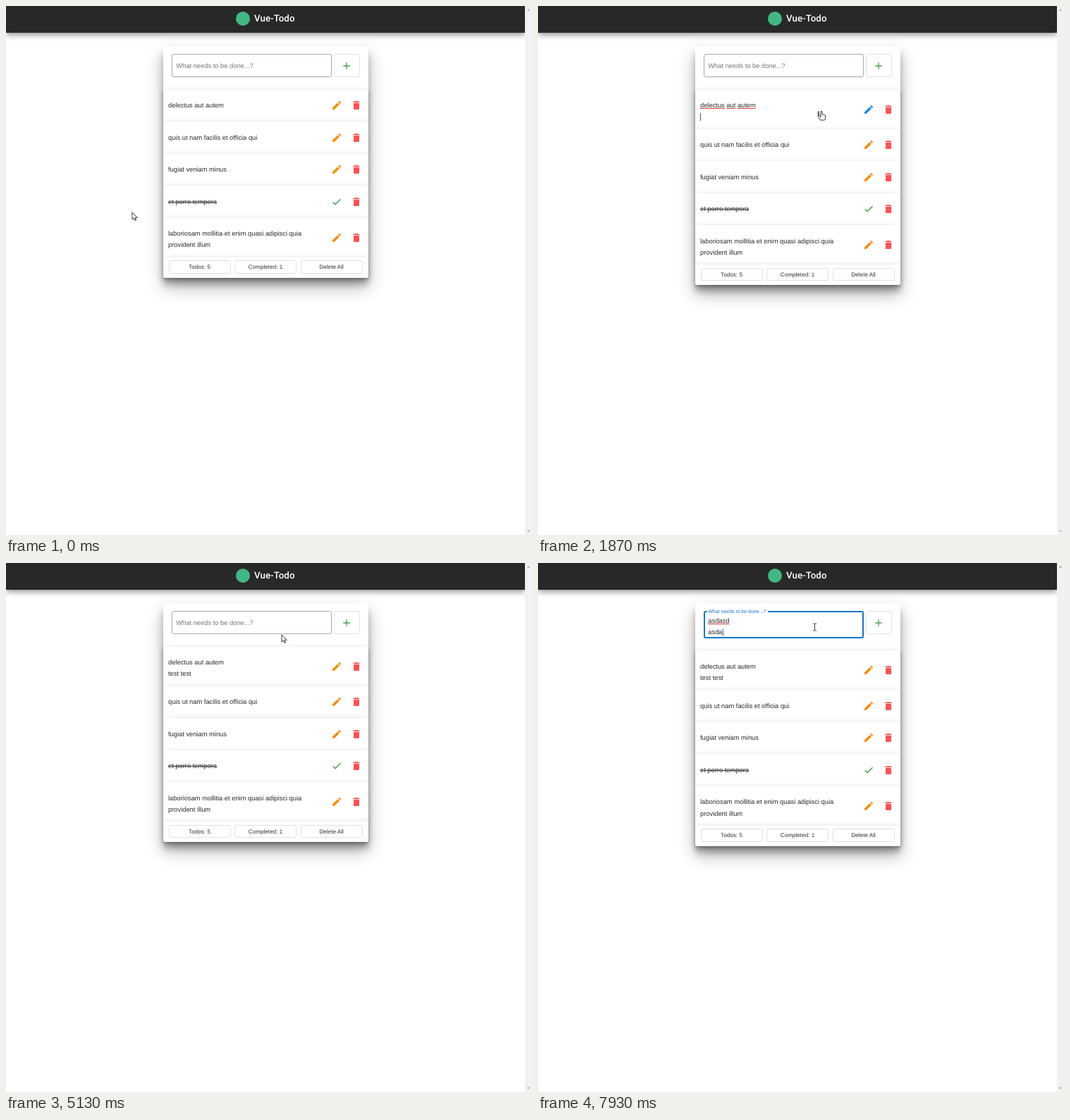
Recreate the animation shown at these times as an HTML page. Size 746 by 751 pixels, loop 8 s.

```html
<!DOCTYPE html>
<html lang="en">
<head>
<meta charset="utf-8">
<title>Vue-Todo</title>
<style>
html, body { margin: 0; width: 100%; height: 100%; overflow: hidden; background: #fff; }
body { position: relative; font: 9.33px/16.33px "Liberation Sans", Arial, sans-serif; color: #2b2b2b; text-rendering: geometricPrecision; }
body *, body { box-sizing: border-box; }
header { position: absolute; left: 0; top: 0; width: 736px; height: 37.5px; background: #282828; color: #fff;
  box-shadow: 0 2.7px 8px rgba(0,0,0,.42); font: 500 13.33px/37px Roboto, sans-serif; letter-spacing: .1px; }
header b { position: absolute; left: 326px; top: 8px; width: 20px; height: 20px; border-radius: 50%; background: #41b883; }
header span { position: absolute; left: 352px; }
#bar { position: absolute; right: 0; top: 0; width: 10px; height: 100%; background: #f1f1f1; }
#bar path { fill: #a3a3a3; }
main { position: absolute; left: 223px; top: 57px; width: 290.5px; background: #fff; border-radius: 2.7px;
  box-shadow: 0 12.7px 25px rgba(0,0,0,.3), 0 10px 8px rgba(0,0,0,.22); }
#pane { position: relative; height: 61.5px; }
#field, #add { position: absolute; top: 11.2px; height: 33px; border-radius: 2.7px; }
#field { left: 11.7px; width: 227.6px; border: 1px solid #a8a8a8; }
#add { left: 241.5px; width: 37.5px; border: 1px solid #e2e2e2; }
#add svg { left: 9.8px; top: 7.5px; color: #43a047; }
#notch { position: absolute; left: 16.5px; top: 10px; height: 4px; background: #fff; }
#label { position: absolute; left: 18.3px; top: 0; line-height: 12px; white-space: pre; transform-origin: 0 0; }
#input { position: absolute; left: 18.3px; top: 17px; white-space: pre; }
.row, footer { position: relative; background: #fff;
  box-shadow: 0 2px 3.3px -.7px rgba(0,0,0,.2), 0 3.3px 5.3px rgba(0,0,0,.14), 0 .7px 9px rgba(0,0,0,.12); }
.row { min-height: 45.5px; padding: 14.5px 7px 8.9px; white-space: pre; }
.done .text { text-decoration: line-through; }
svg { position: absolute; fill: currentColor; }
.row svg { top: calc(50% - 8px); width: 16px; height: 16px; }
.edit { left: 238px; color: #fb8c00; }
.done .edit { color: #43a047; }
.bin { left: 266px; color: #ff5252; }
footer { height: 29.3px; border-radius: 0 0 2.7px 2.7px; }
footer span { position: absolute; top: 4.7px; width: 88px; height: 18.7px; border: 1px solid #e0e0e0; border-radius: 2.7px;
  text-align: center; font-size: 8px; line-height: 17px; letter-spacing: .08px; }
u { text-decoration: underline #e53935 1px; text-underline-offset: 1px; text-decoration-skip-ink: none; }
i { display: inline-block; width: 1px; height: 11px; margin-right: -1px; vertical-align: -2.3px; background: #555; }
#input i { background: #3f7cba; }
#ripple { position: absolute; left: 234px; width: 24px; height: 24px; border-radius: 50%; background: #fb8c00; }
#cursor { left: 0; top: 0; overflow: visible; width: 1px; height: 1px; }
#cursor path { fill: #fff; stroke: #222; stroke-width: .9; stroke-linejoin: round; }
</style>
</head>
<body>
<header><b></b><span>Vue-Todo</span></header>
<main>
  <div id="pane">
    <div id="field"></div>
    <div id="notch"></div>
    <div id="label">What needs to be done...?</div>
    <div id="input"></div>
    <div id="add"></div>
  </div>
  <div id="list"></div>
  <footer></footer>
</main>
<svg id="bar" viewBox="0 0 10 751"><path d="M2.8 6.5 5 4l2.2 2.5zM2.8 744.5 5 747l2.2-2.5z"/></svg>
<svg id="cursor">
  <path id="arrow" d="M0 0V10.2L2.4 8 4 11.6 5.5 10.9 4 7.4H7.2Z"/>
  <path id="hand" d="M-1 .8Q0-.6 1 .8V5L2.6 5.2 4.2 5.6 5.6 6.2V10L4.6 13H-1.6L-4.6 8.8Q-5-7.3-3.2 7.2L-1 8.6Z"/>
  <path id="beam" d="M-2.5-5H-.7L0-4.4.7-5H2.5M0-4.4V4.4M-2.5 5H-.7L0 4.4.7 5H2.5"/>
</svg>
<script>
const $ = id => document.getElementById(id);
const clamp = v => Math.min(1, Math.max(0, v));
const ease = p => p * p * (3 - 2 * p);
const icon = (cls, d) => `<svg class="${cls}" viewBox="0 0 24 24" width="16" height="16"><path d="${d}"/></svg>`;
const PENCIL = 'M3 17.25V21h3.75L17.81 9.94l-3.75-3.75zM20.71 7.04a1 1 0 0 0 0-1.41l-2.34-2.34a1 1 0 0 0-1.41 0l-1.83 1.83 3.75 3.75z';
const BIN = 'M6 19c0 1.1.9 2 2 2h8c1.100 0 2-.9 2-2V7H6zM19 4h-3.500l-1-1h-5l-1 1H5v2h14z';
const CHECK = 'M9 16.170 4.830 12l-1.420 1.410L9 19 21 7l-1.410-1.410z';
const PLUS = 'M19 13h-6v6h-2v-6H5v-2h6V5h2v6h6z';

const todos = ['delectus aut autem', 'quis ut nam facilis et officia qui', 'fugiat veniam minus',
  'et porro tempora', 'laboriosam mollitia et enim quasi adipisci quia\nprovident illum'];
$('list').innerHTML = todos.map((text, n) =>
  `<div class="row${n == 3 ? ' done' : ''}">${n ? '' : '<div id="ripple"></div>'}<span class="text">${text}</span>` +
  icon('edit', n == 3 ? CHECK : PENCIL) + icon('bin', BIN) + '</div>').join('');
document.querySelector('footer').innerHTML = ['Todos: 5', 'Completed: 1', 'Delete All']
  .map((s, n) => `<span style="left:${7.5 + n * 93.6}px">${s}</span>`).join('');
$('add').innerHTML = icon('', PLUS);

// Steps are [time, value]; the last one reached holds.
const at = (steps, t) => steps.reduce((v, s) => t >= s[0] ? s[1] : v, steps[0][1]);
const typed = [[0, ''], [1870, '\n'], [2930, '\nt'], [3070, '\nte'], [3130, '\ntes'], [3200, '\ntest'], [3330, '\ntest '],
  [3600, '\ntest te'], [3730, '\ntest tes'], [3870, '\ntest test']];
const entry = [[0, ''], [5870, 'a'], [5930, 'as'], [6000, 'asd'], [6200, 'asda'], [6270, 'asdas'], [6330, 'asdasd'],
  [6670, 'asdasd\n'], [7670, 'asdasd\na'], [7800, 'asdasd\nasd'], [7930, 'asdasd\nasda']];
const blink = [[0, 0], [1070, 1], [1600, 0], [1870, 1], [2400, 0], [2930, 1], [4400, 0],
  [5470, 1], [7200, 0], [7670, 1]];
const path = [[70, 179, 293], [870, 469, 139], [1070, 469, 139], [1330, 402, 149], [4330, 402, 149],
  [4670, 468, 146], [4770, 468, 146], [5130, 391, 102], [5270, 392.5, 91]];
const EDIT = 1070, SAVE = 4730, FOCUS = 5400;

function pointer(t) {
  const n = path.findIndex(k => t < k[0]);
  if (n < 0) return path.at(-1).slice(1);
  if (!n) return path[0].slice(1);
  const [a, b] = [path[n - 1], path[n]], p = ease((t - a[0]) / (b[0] - a[0]));
  return [1, 2].map(c => a[c] + (b[c] - a[c]) * p);
}

const row = document.querySelector('.row'), text = row.querySelector('.text'), pencil = row.querySelector('.edit');
const underline = s => s.replace(/\w+/g, '<u>$&</u>');

function render(t) {
  const caret = `<i style="visibility:${at(blink, t) ? 'visible' : 'hidden'}"></i>`;
  const editing = t >= EDIT && t < SAVE, focused = t >= FOCUS;
  text.innerHTML = (editing ? underline(todos[0]) : todos[0]) + at(typed, t) + (editing ? caret : '');
  pencil.style.color = editing ? '#1e88e5' : '';

  const since = t - (t < 3000 ? 1000 : 4700), grow = clamp(since / 200);
  $('ripple').style.cssText = `top:${row.offsetHeight / 2 - 12}px;transform:scale(${grow});` +
    `opacity:${since < 0 ? 0 : .16 * clamp((330 - since) / 150)}`;

  const float = focused ? ease(clamp((t - FOCUS) / 170)) : 0, tall = t >= 6670;
  $('label').style.transform = `translateY(${21.5 - 14 * float}px) scale(${1 - .25 * float})`;
  $('label').style.color = focused ? '#1976d2' : '#757575';
  $('notch').style.width = 86 * float + 'px';
  $('field').style.border = focused ? `${t < 5670 ? 1 : 2}px solid #1976d2` : '';
  $('field').style.height = tall ? '38.7px' : '';
  $('pane').style.height = tall ? '67.200px' : '';
  const value = at(entry, t);
  $('input').innerHTML = (t >= 6730 ? value.replace('asdasd', '<u>$&</u>') : value) + (focused ? caret : '');

  const [x, y] = pointer(t);
  const inside = x > 223 && x < 513;
  const shape = inside && y > 118 && y < 357 ? 'hand' : inside && y < 101 ? 'beam' : 'arrow';
  for (const id of ['arrow', 'hand', 'beam']) $(id).style.display = id == shape ? '' : 'none';
  $('cursor').style.transform = `translate(${x}px,${y}px)`;
}

function frame() {
  render(performance.now() % 8000);
  requestAnimationFrame(frame);
}
frame();
</script>
</body>
</html>
```
